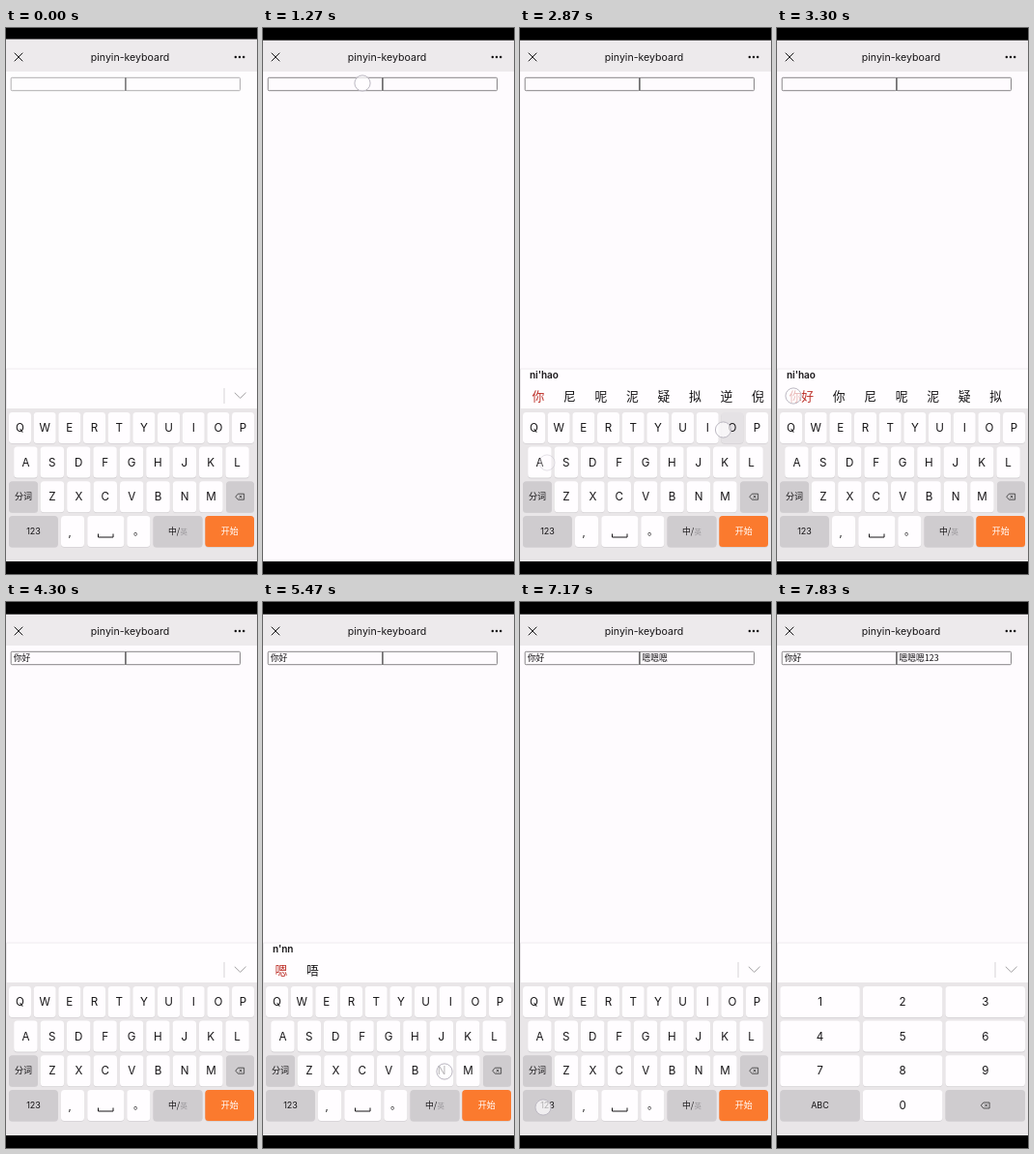
Write an HTML page with a canvas that moves like this. It is 260x564 px and loops after 8 s.

```html
<!DOCTYPE html>
<html lang="zh">
<head>
<meta charset="utf-8">
<title>pinyin-keyboard</title>
<style>
html, body { margin: 0; width: 100%; height: 100%; overflow: hidden; background: #000; }
canvas { display: block; width: 260px; height: 564px; }
</style>
</head>
<body>
<canvas id="stage"></canvas>
<script>
const W = 260, H = 564, LOOP = 8000;
const canvas = document.getElementById('stage');
const ctx = canvas.getContext('2d');
const dpr = window.devicePixelRatio || 1;
canvas.width = W * dpr;
canvas.height = H * dpr;

const LATIN = 'Inter, "Noto Sans CJK SC", "Noto Sans CJK", sans-serif';
const CJK = '"Noto Sans CJK SC", "Noto Sans CJK", sans-serif';
const INK = '#161416', WHITE = '#fffdff', GREY = '#cfcccf', PRESSED = '#e5e2e5';
const ROWS = [397, 432.6, 468.2, 504];
const KEY_H = 32;
const PRESS_MS = 60, HOLD_MS = 90, FADE_MS = 70;

// Finger taps: time, position, key and optional hold
const taps = [
  { t: 1270, x: 103, y: 57 },
  { t: 2470, x: 186, y: 484, key: 'N' },
  { t: 2570, x: 196, y: 414, key: 'I' },
  { t: 2660, x: 158, y: 448, key: 'H' },
  { t: 2740, x: 28, y: 449, key: 'A' },
  { t: 2830, x: 210.5, y: 415, key: 'O' },
  { t: 3250, x: 17, y: 380 },
  { t: 4000, x: 190, y: 55.5, hold: 190 },
  { t: 5230, x: 187, y: 485, key: 'N' },
  { t: 5320, x: 188, y: 485, key: 'N' },
  { t: 5410, x: 188, y: 485, key: 'N' },
  { t: 6000, x: 15.5, y: 381, hold: 120 },
  { t: 7170, x: 24, y: 522 },
  { t: 7500, x: 45, y: 418, key: '1' },
  { t: 7590, x: 130, y: 418, key: '2' },
  { t: 7670, x: 213, y: 418, key: '3' }
];

// Each list holds [start time, value]
const pinyin = [[0, ''], [2510, 'n'], [2610, 'ni'], [2700, "ni'h"], [2780, "ni'ha"],
  [2865, "ni'hao"], [3340, ''], [5270, 'n'], [5360, "n'n"], [5450, "n'nn"],
  [5510, "n'n'n"], [6110, '']];
const candidates = [[0, ''], [2510, '嗯 唔'], [2610, '你 尼 呢 泥 疑 拟 逆 倪'],
  [2920, '你好 你 尼 呢 泥 疑 拟'], [3340, ''], [5270, '嗯 唔'],
  [5510, '嗯嗯嗯 嗯 唔'], [6110, '']];
const first = [[0, ''], [3360, '你好']];
const second = [[0, ''], [6130, '嗯嗯嗯'], [7540, '嗯嗯嗯1'], [7630, '嗯嗯嗯12'], [7710, '嗯嗯嗯123']];
const layout = [[0, 'abc'], [100, ''], [1430, 'abc'], [7260, 'num']];

function at(list, t) {
  let value = list[0][1];
  for (const [start, v] of list) if (t >= start) value = v;
  return value;
}

function rect(x, y, w, h, color) {
  ctx.fillStyle = color;
  ctx.fillRect(x, y, w, h);
}

function text(s, x, y, size, { color = INK, weight = 400, align = 'center', font = LATIN } = {}) {
  ctx.font = `${weight} ${size}px ${font}`;
  ctx.textAlign = align;
  ctx.fillStyle = color;
  ctx.fillText(s, x, y + size * 0.365);
}

function line(points, color, width) {
  ctx.beginPath();
  points.forEach(([x, y], i) => i ? ctx.lineTo(x, y) : ctx.moveTo(x, y));
  ctx.strokeStyle = color;
  ctx.lineWidth = width;
  ctx.stroke();
}

function key(x, row, w, color) {
  const y = ROWS[row];
  ctx.beginPath();
  ctx.roundRect(x, y + 0.8, w, KEY_H, 3.5);
  ctx.fillStyle = '#d3d0d3';
  ctx.fill();
  ctx.beginPath();
  ctx.roundRect(x, y, w, KEY_H, 3.5);
  ctx.fillStyle = color;
  ctx.fill();
}

function charKey(s, x, row, w, pressed) {
  key(x, row, w, s === pressed ? PRESSED : WHITE);
  text(s, x + w / 2, ROWS[row] + 16, 11.6);
}

function backspace(x, y) {
  line([[x - 4.5, y], [x - 2, y - 3], [x + 4.3, y - 3], [x + 4.3, y + 3], [x - 2, y + 3], [x - 4.5, y]], '#333', 0.8);
  line([[x - 0.5, y - 1.3], [x + 2.1, y + 1.3]], '#333', 0.8);
  line([[x - 0.5, y + 1.3], [x + 2.1, y - 1.3]], '#333', 0.8);
}

function header(top) {
  rect(0, top, W, 45 - top, '#edeaec');
  line([[8.7, 25.7], [17.3, 34.3]], INK, 1);
  line([[8.7, 34.3], [17.3, 25.7]], INK, 1);
  text('pinyin-keyboard', 128.5, 30.5, 10.6);
  for (const x of [237.8, 242, 246.2]) {
    ctx.beginPath();
    ctx.arc(x, 30, 1.25, 0, 7);
    ctx.fillStyle = INK;
    ctx.fill();
  }
}

function field(x, value, border) {
  ctx.beginPath();
  ctx.roundRect(x, 51.3, 118.6, 13.4, 1);
  ctx.strokeStyle = border;
  ctx.lineWidth = 0.9;
  ctx.stroke();
  text(value, x + 2.6, 58, 8.8, { align: 'left', font: CJK });
}

function toolbar(t) {
  rect(0, 352, W, 41, WHITE);
  line([[0.5, 393], [0.5, 352], [W, 352]], '#eeebee', 1);
  const typed = at(pinyin, t);
  if (!typed) {
    line([[226, 372], [226, 388]], '#d2cfd2', 0.9);
    line([[236.8, 376.7], [242.7, 382.4], [248.6, 376.7]], '#a29fa2', 1);
    return;
  }
  text(typed, 10, 358, 10, { weight: 600, align: 'left' });
  let x = 12.5;
  at(candidates, t).split(' ').forEach((word, i) => {
    text(word, x, 380, 12.8, { color: i ? INK : '#bd2f28', align: 'left', font: CJK });
    x += 12.8 * word.length + 19.7;
  });
}

function letterKeys(pressed) {
  [...'QWERTYUIOP'].forEach((c, i) => charKey(c, 3 + i * 25.67, 0, 23, pressed));
  [...'ASDFGHJKL'].forEach((c, i) => charKey(c, 8.2 + i * 27.4, 1, 24.4, pressed));
  [...'ZXCVBNM'].forEach((c, i) => charKey(c, 35.8 + i * 27.4, 2, 24.4, pressed));
  key(3, 2, 30, GREY);
  text('分词', 18, 484.2, 9, { font: CJK });
  key(228, 2, 29, GREY);
  backspace(242.3, 484.2);

  key(3, 3, 50.8, GREY);
  text('123', 28.5, 520, 9);
  key(57, 3, 24, WHITE);
  text(',', 66, 521, 11);
  key(84.3, 3, 38, WHITE);
  line([[95.5, 522.5], [95.5, 526], [111, 526], [111, 522.5]], INK, 1);
  key(125.3, 3, 24, WHITE);
  text('。', 137.5, 520, 11, { font: CJK });
  key(152.5, 3, 51, GREY);
  text('中/', 168, 520, 8.8, { weight: 500, align: 'left', font: CJK });
  text('英', 180.5, 520.3, 7.4, { color: '#99969a', align: 'left', font: CJK });
  key(206.3, 3, 50.7, '#fb7a2e');
  text('开始', 231.7, 520, 9, { color: '#fff', font: CJK });
}

function numberKeys(pressed) {
  for (let i = 0; i < 9; i++) {
    charKey(String(i + 1), 3.3 + (i % 3) * 85.6, Math.floor(i / 3), 82.5, pressed);
  }
  key(3.3, 3, 82.5, GREY);
  text('ABC', 44.5, 520, 9);
  charKey('0', 88.9, 3, 82.5, pressed);
  key(174.5, 3, 82.5, GREY);
  backspace(215.8, 520);
}

function touches(t) {
  for (const tap of taps) {
    const age = t - tap.t, hold = tap.hold || HOLD_MS;
    if (age < 0 || age >= hold + FADE_MS) continue;
    ctx.globalAlpha = Math.min(1, 1 - (age - hold) / FADE_MS);
    ctx.beginPath();
    ctx.arc(tap.x, tap.y, 8.1, 0, 7);
    ctx.fillStyle = 'rgba(255,253,255,.68)';
    ctx.fill();
    ctx.strokeStyle = '#bcb8c2';
    ctx.lineWidth = 1;
    ctx.stroke();
    ctx.globalAlpha = 1;
  }
}

function draw(t) {
  ctx.setTransform(dpr, 0, 0, dpr, 0, 0);
  const opening = t < 100;
  rect(0, 0, W, H, '#000');
  rect(0, 45, W, 506, opening ? '#fefdfe' : '#fefbfe');
  header(opening ? 11.5 : 12.7);

  const border = opening ? '#a9a6a9' : '#7c797c';
  field(5.2, at(first, t), border);
  field(123.9, at(second, t), border);
  line([[123.9, 51], [123.9, 65]], '#555', 0.9);

  const keys = at(layout, t);
  if (keys) {
    toolbar(t);
    rect(0, 393, W, 158, '#e9e6e8');
    const tap = taps.find(p => p.key && t >= p.t && t < p.t + PRESS_MS);
    const pressed = tap && tap.key;
    if (keys === 'abc') letterKeys(pressed);
    else numberKeys(pressed);
  }
  touches(t);
}

const start = performance.now();
function tick() {
  draw((performance.now() - start) % LOOP);
  requestAnimationFrame(tick);
}
tick();
</script>
</body>
</html>
```
